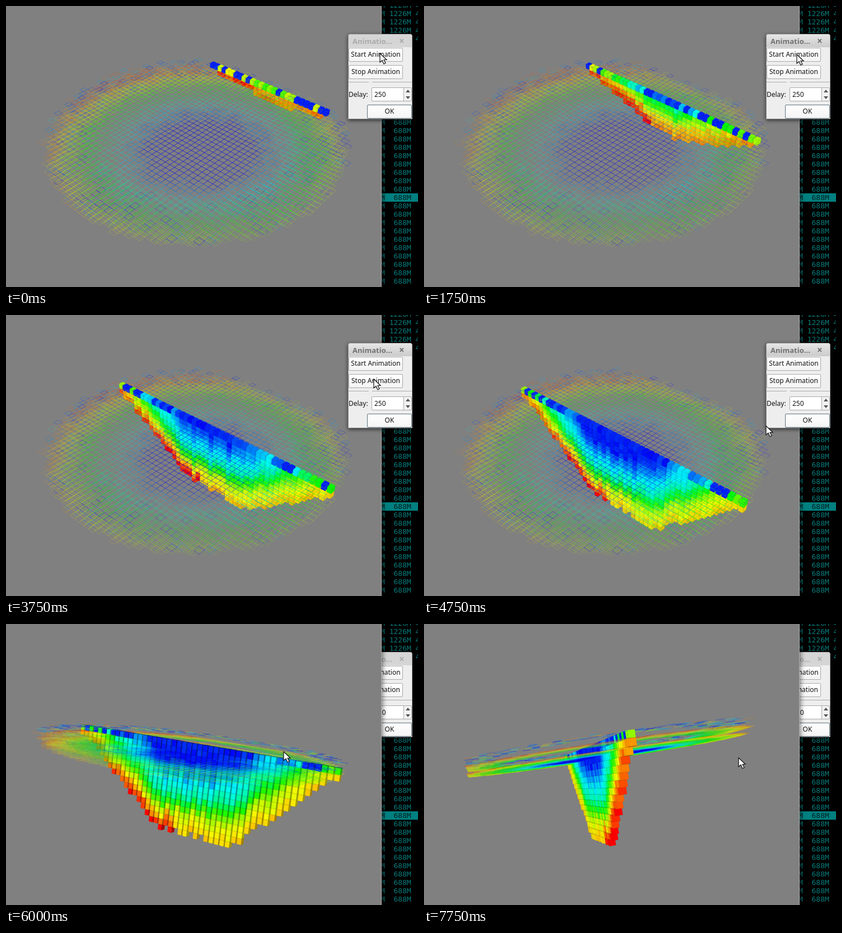
An HTML page with a canvas for the animation above (8000 ms loop, 736 by 504 pixels).

```html
<!DOCTYPE html>
<html lang="en">
<head>
<meta charset="utf-8">
<title>Pit slices</title>
<style>
html, body { margin: 0; width: 736px; height: 504px; overflow: hidden; background: #000; }
body { position: relative; font: 12px "Noto Sans", "Open Sans", sans-serif; color: #111; }
body > *, #dialog > * { position: absolute; box-sizing: border-box; }
#term { left: 671px; top: 0; width: 65px; height: 504px;
  overflow: hidden; background: #000; color: #087c7c; font: 13px "DejaVu Sans Mono", monospace; }
#term div { position: absolute; left: 0; width: 65px; height: 15px; line-height: 15px;
  white-space: pre; text-indent: -2px; }
#term .hit { background: #008080; color: #002020; }
#dialog { left: 611px; top: 50px; width: 115px; height: 153px; background: #eee;
  border: 1px solid #999; border-radius: 4px 4px 0 0; box-shadow: 0 2px 7px #000a; }
#title { left: 0; top: 0; width: 113px; height: 23px; border-radius: 3px 3px 0 0; padding-left: 7px;
  background: linear-gradient(#e6e6e6, #cbcbcb); color: #707070; font-weight: bold; font-size: 13px; line-height: 25px; }
#title span { position: absolute; left: 90px; top: -1px; font-size: 17px; }
.idle #title { background: #d5d5d5; color: #aaa; }
.btn { height: 25px; line-height: 22px; text-align: center; border: 1px solid #aaa;
  border-radius: 2px; background: linear-gradient(#fff, #f4f4f4); }
.line { top: 85px; height: 1px; background: #aaa; }
#spin { left: 41px; top: 95px; width: 72px; height: 25px; line-height: 23px; padding-left: 4px;
  border: 1px solid #aaa; border-radius: 2px; background: linear-gradient(90deg, #fff 56px, #aaa 56px 57px, #f2f2f2 57px); }
#spin svg { position: absolute; left: 58px; top: 0; }
#view { z-index: 1; left: 0; top: 0; box-shadow: 1px 0 9px #0009; }
#dialog { z-index: 2; }
#dialog.back { z-index: 0; }
#mouse { z-index: 3; left: 0; top: -1px; }
</style>
</head>
<body>
<div id="term"></div>
<canvas id="view" width="671" height="504"></canvas>
<div id="dialog">
  <div id="title">Animatio...<span>×</span></div>
  <div class="btn" style="left:0;top:24px;width:97px">Start Animation</div>
  <div class="btn" style="left:0;top:55px;width:97px">Stop Animation</div>
  <div class="line" style="left:0;width:36px"></div>
  <div class="line" style="left:42px;width:71px"></div>
  <div style="left:0;top:99px">Delay:</div>
  <div id="spin">250<svg width="12" height="23"><path d="M2 8L6 3L10 8ZM2 15L6 20L10 15Z" fill="#555"/></svg></div>
  <div class="btn" style="left:33px;top:126px;width:80px;border-color:#5d7482">OK</div>
</div>
<svg id="mouse" width="16" height="22"><path d="M1 1V17L5 13.5L8 20L11 18.5L8 12.5H13Z" fill="#fff" stroke="#111" stroke-width="1.2"/></svg>
<script>
const $ = id => document.getElementById(id);
const ctx = $('view').getContext('2d');
const R = 25, SIZE = 10.8, DIST = 90, LOOP = 8000, STEP = 250;

// time, then values
const SLICE = [[500, -20], [1750, -14], [2750, -9.2], [3750, -4.6], [4250, -1.4]];
// time, centre x, y, azimuth, elevation, roll
const CAMERA = [[4750, 337, 223, 42, 35.3, 0], [6000, 333, 215, 28, 6, 6.5],
  [6750, 333, 215, 28, 6, 6.5], [7750, 312, 217, -103, -3, -8.6]];
const MOUSE = [[0, 667, 85], [1750, 665, 87], [2750, 656, 89], [3250, 656, 100], [3750, 656, 115],
  [4250, 656, 116], [4750, 610, 199], [6000, 495, 229], [6750, 495, 229], [7750, 561, 240]];
// distance from the pit wall, rainbow value
const GRADE = [[0, .78], [3, .68], [6, .33], [8, .25], [10, .14], [12, .03]];

function at(keys, t) {
  const i = keys.findIndex(k => k[0] > t);
  if (i < 0) return keys.at(-1).slice(1);
  if (!i) return keys[0].slice(1);
  const a = keys[i - 1], b = keys[i], f = (t - a[0]) / (b[0] - a[0]);
  return a.slice(1).map((x, n) => x + (b[n + 1] - x) * f);
}
const clamp = (x, lo, hi) => Math.max(lo, Math.min(hi, x));
const rnd = (a, b, c) => {
  const x = Math.sin(a * 12.99 + b * 78.23 + c * 37.72) * 43758.55;
  return x - Math.floor(x);
};
const rainbow = (v, light = 1, alpha = 1) =>
  `hsla(${240 * (1 - clamp(v, 0, 1))},100%,${49 * light}%,${alpha})`;

// Wire cells on three levels
const cells = [];
for (let k = 0; k < 3; k++)
  for (let v = -21; v <= 24; v++)
    for (let u = -R; u <= R; u++) {
      const r = Math.hypot(u, v), q = rnd(u, v, k + 5);
      const keep = k == 0 ? r > 17 && r < R && q < .36
        : k == 1 ? r > 15 + 2 * q && r < 24.2 : r < 22.8 + q;
      if (!keep) continue;
      const near = Math.hypot(u - 2.5, v - 1);
      const val = k == 0 && q < .26 ? q : (near - 8) * .05 + (q - .5) * .16;
      cells.push({ u, v, k, val });
    }

let project, axes;
function setCamera([cx, cy, az, el, roll]) {
  const [ca, sa, ce, se, cr, sr] = [az, el, roll].map(d => d * Math.PI / 180)
    .flatMap(x => [Math.cos(x), Math.sin(x)]);
  project = (u, v, k) => {
    const g = u * sa + v * ca, z = g * ce - k * se;
    const m = SIZE / (1 - z / DIST), x = (u * ca - v * sa) * m, y = (g * se + k * ce) * m;
    return [cx + x * cr - y * sr, cy + x * sr + y * cr, z];
  };
  axes = [[ca, sa * ce], [-sa, ca * ce], [0, -se]];
}

function poly(pts) {
  ctx.beginPath();
  for (const p of pts) ctx.lineTo(p[0], p[1]);
  ctx.closePath();
}

function wires(list, fade) {
  ctx.lineWidth = 1;
  for (const { u, v, k, val } of list) {
    poly([[-.5, -.5], [.5, -.5], [.5, .5], [-.5, .5]].map(([a, b]) => project(u + a, v + b, k)));
    ctx.strokeStyle = rainbow(val, .95, (val < .2 ? .36 : .26) * fade);
    ctx.stroke();
  }
}

// corner bits: 1 = u, 2 = v, 4 = depth
const FACES = [[0, 2, 6, 4], [1, 5, 7, 3], [0, 4, 5, 1], [2, 3, 7, 6], [0, 1, 3, 2], [4, 6, 7, 5]];
function block({ u, v, k, val }) {
  const c = [...Array(8).keys()].map(i =>
    project(u + (i & 1 ? .38 : -.38), v + (i & 2 ? .5 : -.5), k + (i & 4 ? 1 : 0)));
  FACES.forEach((face, i) => {
    const [p, q, r, s] = face.map(n => c[n]);
    if ((r[0] - p[0]) * (s[1] - q[1]) - (r[1] - p[1]) * (s[0] - q[0]) <= 0) return;
    const [nx, nz] = axes[i >> 1].map(n => i & 1 ? n : -n);
    poly([p, q, r, s]);
    ctx.fillStyle = rainbow(val, clamp(2.2 * nz - .8 * nx + .34, .62, 1));
    ctx.fill();
    ctx.strokeStyle = 'rgba(0,0,0,.07)';
    ctx.lineWidth = .6;
    ctx.stroke();
  });
}

// Rainbow value: high along the wall, low in the core, noisy at the surface
function grade(u, v, k, n) {
  const d = n - 1 - k, q = rnd(u, Math.round(v), k);
  let [val] = at(GRADE, u > 4 ? d * .85 : d);
  val += (q - .5) * .05;
  if (d < 3) val += Math.abs(v) * .005;
  if (d < 2.5 && u < -2) val += (.07 + .012 * Math.min(k, 9)) * (1 - d / 3) + (q - .5) * .06;
  if (k == 0 && d < 10) val = q < .38 ? .03 : val - .3 * q;
  return val;
}

function slice(v) {
  const half = Math.sqrt(24.4 ** 2 - v * v), deep = 16 - .68 * Math.abs(v + 1), list = [];
  for (let u = -Math.floor(half); u <= half; u++) {
    const wall = 1 + deep * (u < 0 ? .05 : .059) * (half - Math.abs(u));
    const n = Math.max(1, Math.round(Math.min(deep, wall) + rnd(u, Math.round(v), 50) * .8 - .4));
    for (let k = 0; k < n; k++)
      list.push({ u, v, k, val: grade(u, v, k, n), z: project(u, v, k + .5)[2] });
  }
  list.sort((a, b) => a.z - b.z).forEach(block);
}

function draw(t) {
  const [v] = at(SLICE, t), [mx, my] = at(MOUSE, t), fade = t < 750 ? 1 : .85;
  setCamera(at(CAMERA, t));
  ctx.fillStyle = '#808080';
  ctx.fillRect(0, 0, 670, 504);
  const front = c => (c.v - v) * axes[1][1] > 0;
  wires(cells.filter(c => !front(c)), fade);
  slice(v);
  wires(cells.filter(front), fade);
  ctx.fillStyle = '#aaa';
  ctx.fillRect(670, 0, 1, 504);
  $('dialog').className = t < 250 ? 'idle' : t < 5000 ? '' : 'idle back';
  $('mouse').style.transform = `translate(${Math.round(mx)}px,${Math.round(my)}px)`;
}

for (let i = 0; i < 34; i++) {
  if (i > 4 && i < 14) continue;
  const row = document.createElement('div');
  row.textContent = i < 4 ? 'M 1226M 4' : i == 4 ? '        4' : 'M  688M';
  row.style.top = i * 15 - 9 + 'px';
  if (i == 23) row.className = 'hit';
  $('term').append(row);
}

let shown = -1;
function tick() {
  const t = Math.floor(performance.now() % LOOP / STEP) * STEP;
  if (t != shown) draw(shown = t);
  requestAnimationFrame(tick);
}
tick();
</script>
</body>
</html>
```
